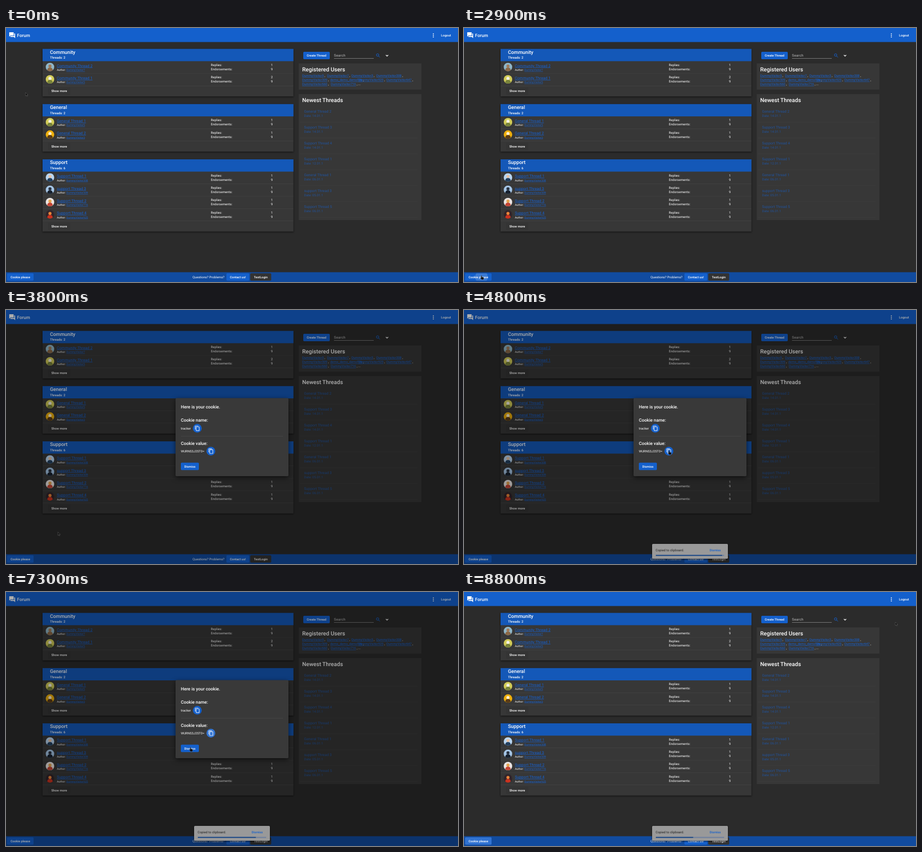
Write an HTML page that moves like this. It is 853x480 px and loops after 8.9 s.

```html
<!DOCTYPE html>
<html lang="en">
<head>
<meta charset="utf-8">
<title>Forum</title>
<style>
html, body { margin: 0; width: 100%; height: 100%; overflow: hidden; background: #2b2b2b; }
svg { display: block; width: 853px; height: 480px; font-family: Roboto, Arial, sans-serif; text-rendering: geometricPrecision; }
.link { fill: #1463d8; text-decoration: underline; }
.card { filter: drop-shadow(0 1.5px 1.5px #000a); }
.dialog { filter: drop-shadow(0 3px 5px #0009); }
</style>
</head>
<body>
<svg id="stage" viewBox="0 0 853 480"></svg>
<script>
const LOOP = 8900, BLUE = '#1460cc', PANEL = '#373737';
const stage = document.getElementById('stage');

const text = (x, y, size, str, attrs = '') =>
  `<text x="${x}" y="${y}" font-size="${size}" fill="#fff" ${attrs}>${str}</text>`;
const bold = (x, y, size, str, attrs = '') => text(x, y, size, str, 'font-weight="500" ' + attrs);
const rect = (x, y, w, h, fill, attrs = '') =>
  `<rect x="${x}" y="${y}" width="${w}" height="${h}" fill="${fill}" ${attrs}/>`;
const circle = (x, y, r, fill, attrs = '') => `<circle cx="${x}" cy="${y}" r="${r}" fill="${fill}" ${attrs}/>`;
const rule = (x, y, w, fill = '#484848') => rect(x, y, w, .5, fill);
const button = (x, y, w, label, fill = BLUE) =>
  rect(x, y, w, 14, fill, 'rx="1.8"') + bold(x + w / 2, y + 9.1, 5.9, label, 'text-anchor="middle"');
const user = n => 'DummyVisitor' + n;

// Avatar palettes: background, head, body
const looks = {
  sky: ['#8fb6c8', '#a27a58', '#8a6847'],
  lime: ['#d3cd58', '#f3f1e4', '#77823b'],
  gold: ['#efb00c', '#fff0cf', '#5a3b16'],
  pale: ['#b9d6f2', '#e9c4a5', '#24405f'],
  navy: ['#a4c4e4', '#27303e', '#18212e'],
  rose: ['#ebe5e2', '#e5a34e', '#c44535'],
  dusk: ['#31242a', '#e8843a', '#c8321f']
};

function avatar(x, y, look) {
  const [back, head, body] = looks[look];
  return circle(x, y, 8, back) + circle(x, y - 1.8, 2.9, head) +
    `<path d="M${x - 5.2} ${y + 6}q.4-5 5.2-5t5.2 5q-5.2 3.9-10.4 0z" fill="${body}"/>`;
}

function section(top, title, count, rows) {
  let out = rect(69, top, 473.5, 43.2 + rows.length * 23.3, PANEL, 'class="card"') +
    rect(69, top, 473.5, 23.2, '#1458b8') +
    bold(83, top + 9.2, 9.3, title) + bold(83, top + 18.7, 6.1, 'Threads: ' + count);
  rows.forEach(([name, author, look, replies], i) => {
    const y = top + 23.2 + i * 23.3;
    out += avatar(83, y + 11, look) +
      text(96, y + 10.9, 7.11, name, 'class="link" letter-spacing=".07"') +
      text(96, y + 18.3, 5.1, 'Author:') +
      text(114, y + 18.3, 5.1, user(author), 'class="link"') +
      text(386.5, y + 9.3, 6.1, 'Replies:') + text(500, y + 9.3, 6.1, replies) +
      text(386.5, y + 17.4, 6.1, 'Endorsements:') + text(500, y + 17.4, 6.1, 9) +
      rule(69, y + 23.1, 473.5);
  });
  const y = top + 23.2 + rows.length * 23.3;
  return out + button(79, y + 3, 42.5, 'Show more', '#343434');
}

function sidebar() {
  let out = button(561, 45, 50, 'Create Thread') +
    text(619, 53.8, 6.4, 'Search', 'letter-spacing=".4" fill-opacity=".75"') + rect(619, 57.2, 75, .6, '#aaa') +
    `<g fill="none" stroke="${BLUE}" stroke-width="1"><circle cx="701.3" cy="51" r="2.3"/><path d="M703 52.8l2.7 2.7"/></g>` +
    '<path d="M716.9 51l2.2 2.2 2.2-2.2" fill="none" stroke="#fff" stroke-width="1.1"/>' +
    rect(552.5, 67, 231.5, 49.5, PANEL) + bold(559, 81.6, 10.6, 'Registered Users') +
    rect(552.5, 125, 231.5, 238, PANEL) + bold(559, 139.6, 10.6, 'Newest Threads');
  const members = [
    [[559, user(5)], [606, user(7)], [652, user(3)], [699, user(308)]],
    [[559, user(309)], [612, 'demo_demo_demofolk'], [665, user(925)], [718, user(647)]],
    [[559, user(660)], [613, user(716)]]
  ];
  members.forEach((line, i) => line.forEach(([x, name]) => {
    const tail = i == 2 && x > 600 ? ' , ...' : ' ,';
    out += `<text x="${x}" y="${91.8 + i * 8.2}" font-size="5.95" fill="#fff"><tspan class="link">${name}</tspan>${tail}</text>`;
  }));
  const newest = [
    ['General Thread 2', '14.01.1'], ['Support Thread 3', '14.01.1'], ['Support Thread 4', '14.01.1'],
    ['Support Thread 1', '12.01.1'], ['General Thread 1', '06.01.1'], ['support Thread 3', '05.01.1'],
    ['Support Thread 5', '06.01.1']
  ];
  newest.forEach(([name, date], i) => {
    const y = 160.4 + i * 30;
    out += `<g opacity=".62">${text(562.5, y, 6.85, name, 'style="fill:#1463d8"')}` +
      `${text(562.5, y + 7.9, 6.1, 'Date: ' + date, 'style="fill:#1463d8"')}</g>` + rule(555, y + 17.3, 222, '#444');
  });
  return out;
}

const copyIcon = 'M16 1H4c-1.1 0-2 .9-2 2v14h2V3h12V1zm3 4H8c-1.1 0-2 .9-2 2v14c0 1.1.9 2 2 2h11c1.1 0 2-.9 2-2V7c0-1.1-.9-2-2-2zm0 16H8V7h11v14z';
const copyButton = (x, y, id) => circle(x, y, 8.3, BLUE) + circle(x, y, 8.3, '#fff', `id="${id}" opacity="0"`) +
  `<path d="${copyIcon}" fill="#fff" transform="translate(${x - 5.2} ${y - 5.3})scale(.444)"/>`;

stage.innerHTML = rect(0, 0, 853, 480, '#2b2b2b') +
  section(39.5, 'Community', 2, [['Community Thread 2', 7, 'sky', 1], ['Community Thread 1', 5, 'lime', 2]]) +
  section(143.8, 'General', 2, [['General Thread 1', 5, 'lime', 1], ['General Thread 2', 3, 'gold', 1]]) +
  section(248.2, 'Support', 6, [['Support Thread 1', 308, 'pale', 1], ['support Thread 3', 309, 'navy', 1],
    ['Support Thread 2', 716, 'rose', 1], ['Support Thread 4', 925, 'dusk', 1]]) +
  sidebar() +
  rect(0, 0, 853, 26.5, BLUE) +
  '<path d="M21 6h-2v9H6v2c0 .55.45 1 1 1h11l4 4V7c0-.55-.45-1-1-1zm-4 6V3c0-.55-.45-1-1-1H3c-.55 0-1 .45-1 1v14l4-4h10c.55 0 1-.45 1-1z" fill="#fff" transform="translate(5 7)scale(.555)"/>' +
  bold(20.8, 16.7, 8.5, 'Forum') +
  [11, 14, 17].map(y => circle(806.5, y, .95, '#fff')).join('') + bold(821, 15.8, 6, 'Logout') +
  rect(0, 461.5, 853, 18.5, '#114b9f') + button(2, 463.5, 50, 'Cookie please') +
  rect(2, 463.5, 50, 14, '#fff', 'id="focus" rx="1.8" opacity="0"') +
  '<clipPath id="clip"><rect x="2" y="463.5" width="50" height="14" rx="1.8"/></clipPath>' +
  circle(33, 470.5, 12, '#fff', 'id="ripple" clip-path="url(#clip)" opacity="0"') +
  text(352, 472.8, 6.05, 'Questions? Problems?') +
  button(416, 463.5, 43, 'Contact us!') + button(461, 463.5, 39.5, 'TestLogin', '#333') +
  rect(0, 0, 853, 480, '#000', 'id="scrim"') +
  '<g id="dialog" class="dialog">' + rect(320, 166.5, 213, 147.5, '#393939', 'rx="1.8"') +
  bold(330, 186, 8.4, 'Here is your cookie.') +
  bold(330, 211.2, 8.4, 'Cookie name:') + text(330, 225.8, 6.1, 'tracker') + copyButton(361, 223.5, 'nameGlow') +
  rule(330, 238, 193, '#4c4c4c') +
  bold(330, 254.5, 8.4, 'Cookie value:') + text(330, 269, 5.95, 'WURNS3J2ST0=') + copyButton(386.6, 266.7, 'valueGlow') +
  button(330, 288.5, 34, 'Dismiss') + '</g>' +
  '<g id="snack" class="card">' + rect(355, 442, 143, 28, '#999', 'rx="1.8"') +
  text(361.5, 456.2, 6.05, 'Copied to clipboard.', 'style="fill:#222"') +
  bold(463.5, 456.2, 5.9, 'Dismiss', 'style="fill:#1460cc"') +
  rect(362, 462.8, 129, 1.8, '#6b7f9f') + rect(362, 462.8, 129, 1.8, '#164484', 'id="bar"') + '</g>' +
  '<g id="cursor" fill="#0c0c0c" stroke="#999" stroke-width=".35">' +
  '<path id="arrow" d="M0 0v6.3l1.5-1.3 1 2.2 1-.5-1-2.1h2z"/>' +
  '<path id="hand" d="M-.7.2Q.2-1 .8.2V2.6L3.6 3.2Q4.4 3.4 4.3 4.3L3.8 7.5H.3L-2 4.4Q-1.7 3.4-.7 4.2z"/></g>';

const $ = id => document.getElementById(id);
const set = (id, name, value) => $(id).setAttribute(name, value);
const clamp = v => Math.max(0, Math.min(1, v));
const zoom = (x, y, s) => `translate(${x} ${y})scale(${s})translate(${-x} ${-y})`;

// Pointer stops: time, x, y
const path = [
  [0, 37, 122], [1700, 37, 122], [2000, 43, 190], [2300, 30, 380], [2500, 38, 462], [2700, 33, 468],
  [3600, 33, 468], [4300, 361, 224], [4700, 361, 224], [4800, 387, 266], [6600, 387, 266],
  [7100, 348, 294], [7600, 348, 294], [7800, 351, 293], [8100, 351, 293], [8700, 814, 57], [LOOP, 814, 57]
];

function pointer(t) {
  const i = path.findIndex(p => p[0] > t);
  const [t0, x0, y0] = path[i - 1], [t1, x1, y1] = path[i];
  const p = (t - t0) / (t1 - t0), e = p * p * (3 - 2 * p);
  return [x0 + (x1 - x0) * e, y0 + (y1 - y0) * e];
}

function draw(t) {
  const open = clamp((t - 2940) / 100), shut = clamp((t - 7550) / 75);
  set('scrim', 'opacity', .32 * clamp(open * 1.6) * (1 - shut));
  set('dialog', 'opacity', open * (1 - shut));
  set('dialog', 'transform', zoom(426.5, 240, .7 + .3 * open));

  set('ripple', 'opacity', t >= 2900 && t < 3000 ? .16 : 0);
  set('focus', 'opacity', t >= 3000 && t < 3400 || t >= 7700 ? .12 : 0);
  set('nameGlow', 'opacity', t >= 4600 && t < 4800 ? .12 : 0);
  set('valueGlow', 'opacity', t >= 6500 ? .14 : 0);

  const start = t < 6550 ? 4650 : 6550, shown = clamp((t - start) / 140);
  set('snack', 'opacity', shown);
  set('snack', 'transform', zoom(426.5, 456, .8 + .2 * shown));
  set('bar', 'width', 129 - .026 * Math.max(0, t - start));

  const hand = t >= 2600 && t < 3700 || t >= 4200 && t < 7600;
  set('cursor', 'transform', `translate(${pointer(t)})`);
  set('arrow', 'opacity', hand ? 0 : 1);
  set('hand', 'opacity', hand ? 1 : 0);
}

const begin = performance.now();
function tick() {
  const t = (performance.now() - begin) % LOOP;
  draw(Math.floor(t / 100) * 100);
  requestAnimationFrame(tick);
}
tick();
</script>
</body>
</html>
```
